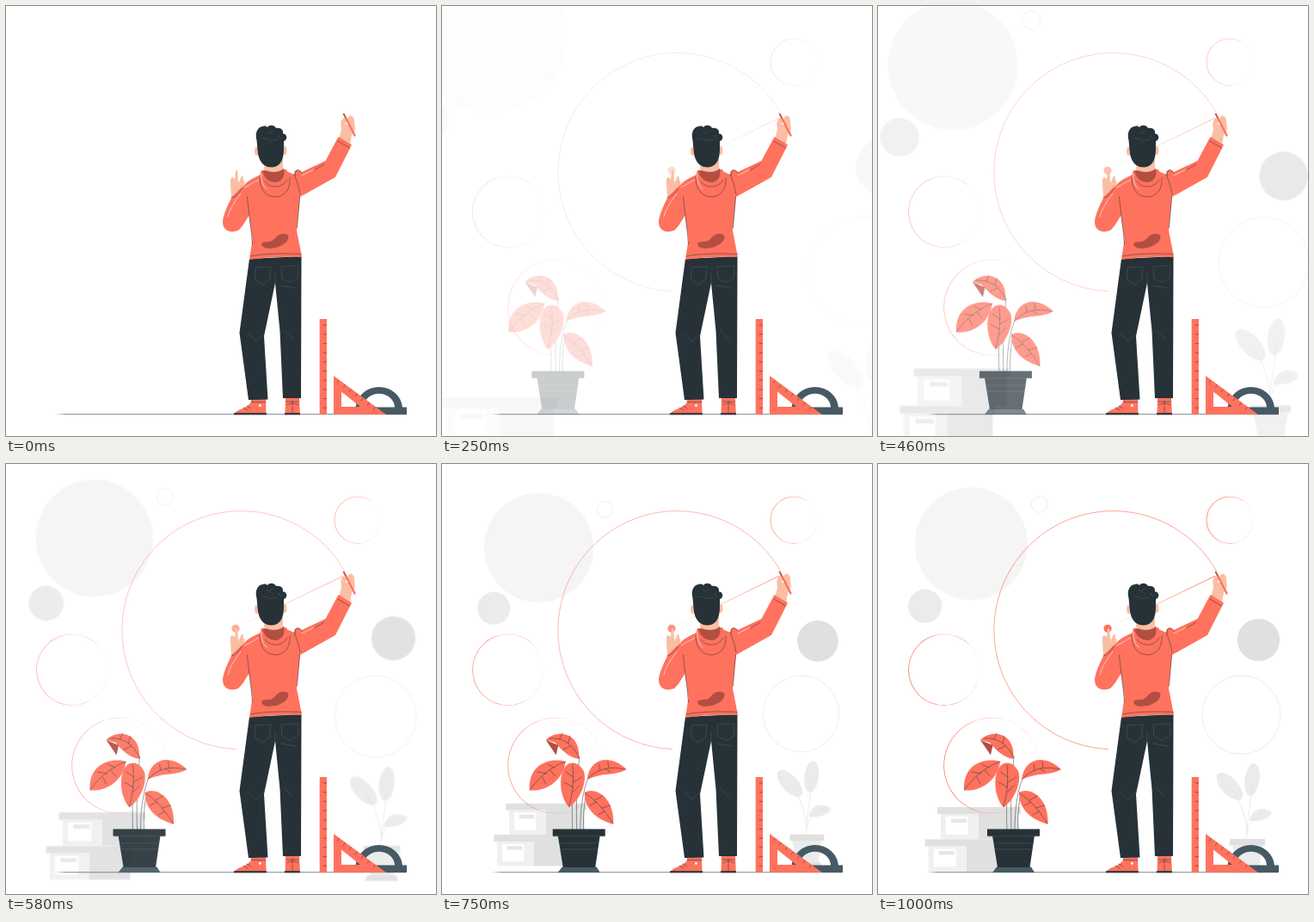
An HTML page that plays this animation: 500x500 px, repeating every 1040 ms.

```html
<!DOCTYPE html>
<html lang="en">
<head>
<meta charset="utf-8">
<title>Drawing circles</title>
<style>
  html, body { margin: 0; width: 100%; height: 100%; overflow: hidden; background: #fff; }
  svg { display: block; width: 100vw; height: 100vh; }
  .red { fill: #ff725e; }
  .deep { fill: #b24f42; }
  .dark { fill: #263238; }
  .slate { fill: #455a64; }
  .skin { fill: #fabea4; }
  .line { fill: none; stroke: #263238; stroke-width: .5; stroke-linecap: round; stroke-linejoin: round; }
  .seam { fill: none; stroke: #56636a; stroke-width: .45; }
  .shine { fill: none; stroke: #fff; stroke-width: .6; stroke-linecap: round; }
</style>
</head>
<body>
<svg viewBox="0 0 500 500">
  <g id="backdrop">
    <circle cx="108.5" cy="92.7" r="65.5" fill="#f5f5f5"/>
    <circle cx="54.7" cy="165.3" r="19.6" fill="#ebebeb"/>
    <circle cx="442.5" cy="204.5" r="24.6" fill="#e0e0e0"/>
    <g fill="none" stroke="#e6e6e6" stroke-width=".7">
      <circle cx="422.5" cy="291.7" r="45.6"/>
      <circle cx="187.7" cy="47" r="9.4"/>
    </g>
    <!-- storage boxes -->
    <g id="box">
      <path fill="#e0e0e0" d="M69 399H166V407H163V436.500H117V407H69Z"/>
      <path fill="#f0f0f0" d="M73 407H117V436.500H73Z"/>
      <path fill="#fff" d="M79 410H105V431H79Z"/>
      <path fill="#e6e6e6" d="M85 412.500H103V417H85Z"/>
    </g>
    <use href="#box" x="-14.300" y="37.500"/>
    <!-- pale plant -->
    <g fill="#ebebeb">
      <ellipse cx="409" cy="375" rx="9.500" ry="20" transform="rotate(-43 409 375)"/>
      <ellipse cx="435" cy="367" rx="8.600" ry="19" transform="rotate(7 435 367)"/>
      <path d="M432 415C433 402 447 396 458 405C456 413 444 416 432 415Z"/>
      <path fill="none" stroke="#e3e3e3" stroke-width=".7" d="M428 436C429 420 432 404 435 374M429 426C427 409 422 392 411 376M429 432C430 420 436 410 450 405"/>
      <path d="M412 443.500H447L443 469H417Z"/>
      <path fill="#e0e0e0" d="M409 436H450V443.500H409ZM413.500 469H445L448.500 475.500H410Z"/>
    </g>
  </g>

  <g id="drawing">
    <g id="rings" class="red" fill-rule="evenodd"></g>
    <path fill="none" stroke="#ff725e" stroke-width=".65" d="M394 125A138.500 138.500 0 1 0 268 331.500"/>
    <path class="red" d="M267 190.700L392 129.700L392.400 130.400Z"/>
    <circle class="red" cx="267" cy="191.300" r="4.600"/>
  </g>

  <path fill="#7d8589" d="M57 475L70 474.300H465V475.300H70Z"/>

  <g id="plant">
    <path class="line" d="M150 425C149 405 150 385 150 372M155 425C154 400 155 372 158 340M159 425C159 402 162 380 168 366M163 425C162 408 164 394 166 382"/>
    <g class="red">
      <path d="M119 321C131 308 160 311 157.500 343C148 342 138 334 130 324L119 321Z"/>
      <path d="M142 346C124 341 98 349 100 379.500C121 381 139 367 142 346Z"/>
      <path d="M147 348C134 352 132 383 146 399.500C158 391 167 372 163.500 358C159 349 153 346 147 348Z"/>
      <path d="M167 367C170 341 194 337 213 355C200 363 186 358 167 367Z"/>
      <path d="M164 382C175 375 199 386 197.500 419C180 414 164 403 164 382Z"/>
    </g>
    <path class="deep" d="M119 321L131 338.500L133.500 327Z"/>
    <path class="line" d="M123 319C139 318 150 325 158 342M135 320L138 313M145 325L147 317M139 332L148 328
      M142 346C126 352 113 362 101 378M129 353L121 349M120 360L109 358M124 356L130 363M115 364L119 372
      M150 350C152 367 150 384 146 398M151 364L142 358M151 376L140 370M151 370L161 364M150 382L158 374
      M168 366C179 354 194 351 211 355M182 356L181 349M192 353L191 346M188 354L194 358
      M165 383C177 391 187 402 197 418M176 391L185 386M184 400L194 397M178 393L170 397M187 404L180 408"/>
    <path class="slate" d="M138 468.500H178L182 475H133Z"/>
    <path class="dark" d="M133 432H182L176.500 469H139Z"/>
    <path class="dark" d="M127 424.500H188V432.700H127Z"/>
    <path class="seam" d="M128 432.800H187M135 441H180M136 448H179"/>
  </g>

  <g id="tools">
    <path class="slate" fill-rule="evenodd" d="M406.500 467A27.300 25.500 0 0 1 461 467ZM415.500 467A18 16 0 0 1 452 467Z"/>
    <path class="slate" d="M406 466.500H466V475H406Z"/>
    <path class="red" fill-rule="evenodd" d="M381 430L442 475H381ZM390 448.500V466H412Z"/>
    <path class="red" d="M364.700 364H373V475H364.700Z"/>
    <path class="line" id="ticks"/>
  </g>

  <g id="man">
    <!-- shoes -->
    <path class="red" d="M284.500 456H302L302.500 474H266C268 469 278 469 285 461ZM325 455H341L341.800 474H324.500Z"/>
    <path class="line" d="M285 460.500H302M276 467L281 470M280 465L285 468M326 460H340M333 459V473M327 464C331 461 336 461 340 464"/>
    <path class="dark" d="M265 473.300H303V475.200H265ZM324 473.300H342V475.200H324Z"/>
    <circle cx="295.500" cy="464.500" r="1.400" fill="#fff"/>
    <!-- trousers -->
    <path class="dark" d="M283 294L343.500 291L343 456H322L318.500 378L313 322L300 384L304.500 457.500L282 458L271.500 380Z"/>
    <path class="seam" d="M290 304L308 303L306.500 318L298.500 324L289.500 318ZM320 303L340 302L339.500 316L331 321.500L321 317ZM313 311V324M319 325L337 328M282 381L291 390L299 382M323 376L334 388"/>
    <!-- raised hand and pencil -->
    <path class="skin" d="M387.500 154L390 143C388 134 391 128 397 131L399 128C403 126 406 131 405 137C407 142 405 147 402 150L400 162Z"/>
    <circle cx="396.500" cy="136.500" r="1.500" fill="#fff"/>
    <path d="M393 126L405.500 150.500" fill="none" stroke="#ff725e" stroke-width="2.300" stroke-linecap="round"/>
    <path class="line" d="M392 125L395 130"/>
    <!-- lowered hand -->
    <path class="skin" d="M262 224L260.800 203C261 198.500 265 198 266 202L266.800 192.500C267.200 190.600 268.900 190.600 269.300 192.500L270.300 206L273.500 198.500C275.500 197 276.500 199 275.500 202C278 203 278 207 276 212L274 216Z"/>
    <!-- hoodie -->
    <path class="red" d="M263 221.500C257 233 252 245 252 251C252 260 259 265 270 261C275 257 279 249 283 243L283 203L274 211Z"/>
    <path class="red" d="M278 207C284 201 293 198 299 194L326 192L335 196C335 190 339 188 344 193L371.500 180L386.500 152L402 161.500L383 199L342 222L338 261L344 292C328 291 301 292 283 295L286.500 272C284 250 280 232 278 207Z"/>
    <path class="line" d="M280.500 222C282 240 285 257 286.500 277M341.500 222L338.500 258M284 291C302 287.500 326 287.500 343.500 288.500M335 196C338 203 341 211 342 219M336 197C336 190 340 189 344 194M386 157L399.500 165M358 191L370 184M262 223C267 222 271 218 274 212"/>
    <path class="shine" d="M278 211L294 202M273 218C263 231 260 238 258 245M344 197L358 190"/>
    <path class="deep" d="M298 275C304 273 308 276 313 270C317 264 327 263 328.500 268C329 275 318 281 310 281.500C301 283 295 279 298 275Z"/>
    <path class="red" d="M297 191C289 213 301 222 314 222C328 221 335 208 326 190Z"/>
    <path class="deep" d="M298 192C300 201 307 205 314 205C321 204 325 198 323 189Z"/>
    <path class="skin" d="M301 178H322V190C316 194 307 194 300 190Z"/>
    <path class="line" d="M295 199C295 216 305 222 314 222C325 221 331 212 330 200M301 204C307 213 322 212 327 202"/>
    <path class="shine" d="M297 195C296 203 299 210 303 213"/>
    <!-- head -->
    <ellipse class="skin" cx="291.700" cy="169" rx="2.700" ry="5"/>
    <ellipse class="skin" cx="323.800" cy="168" rx="2.700" ry="5"/>
    <path class="dark" d="M291.500 156C289 147 293 140 299 140C301 139 303 140 304 141C306 138 312 138 314 142C319 141 323 144 322 148.500C327 148 328 156 323 157L323 167C323 180 318 187.500 308 187.500C297 187 293 177 292.500 167Z"/>
    <path class="seam" d="M297 153C300 157 303 152 306 156C309 158 312 154 315 156M303 146C305 150 309 148 310 145M318 150C316 153 319 155 321 153"/>
  </g>
</svg>
<script>
const $ = id => document.getElementById(id);
const LOOP = 1040, STEP = 1000 / 24;

// Ring whose line thins out towards the right
const circle = (x, y, r) => `M${x - r} ${y}a${r} ${r} 0 1 0 ${2 * r} 0a${r} ${r} 0 1 0 ${-2 * r} 0Z`;
const ring = (x, y, r) => `<path d="${circle(x, y, r)}${circle(x + .35, y, r - .4)}"/>`;
$('rings').innerHTML = ring(76.7, 239.3, 41.6) + ring(409, 65.2, 27.4) + ring(132, 350.6, 55.7);

let ticks = '';
for (let i = 0; i < 10; i++) ticks += `M369 ${371 + i * 10.7}h3.500`;
for (let i = 0; i < 7; i++) ticks += `M${387 + i * 7} ${435.5 + i * 5.2}l-1.500 2.500`;
$('ticks').setAttribute('d', ticks);

// cubic-bezier(.36, -.01, .5, 1.38)
const bezier = (a, b, u) => 3 * a * u * (1 - u) ** 2 + 3 * b * u * u * (1 - u) + u ** 3;
function ease(x) {
  if (x >= 1) return 1;
  let lo = 0, hi = 1;
  for (let i = 0; i < 24; i++) {
    const mid = (lo + hi) / 2;
    if (bezier(.36, .5, mid) < x) lo = mid; else hi = mid;
  }
  return bezier(-.01, 1.38, lo);
}

const fade = (id, alpha) => $(id).setAttribute('opacity', Math.max(0, Math.min(1, alpha)));

function draw(now) {
  const step = Math.floor(now % LOOP / STEP + .08);
  const x = step < 3 ? 0 : Math.min(1, step / 23.1);
  const p = ease(x);
  fade('backdrop', p);
  fade('plant', p);
  fade('drawing', x);
  $('backdrop').setAttribute('transform', `translate(250 250) scale(${1.5 - .5 * p}) translate(-250 -250)`);
  $('plant').setAttribute('transform', `translate(${30 * (p - 1)} 0)`);
  requestAnimationFrame(draw);
}
draw(0);
</script>
</body>
</html>
```
